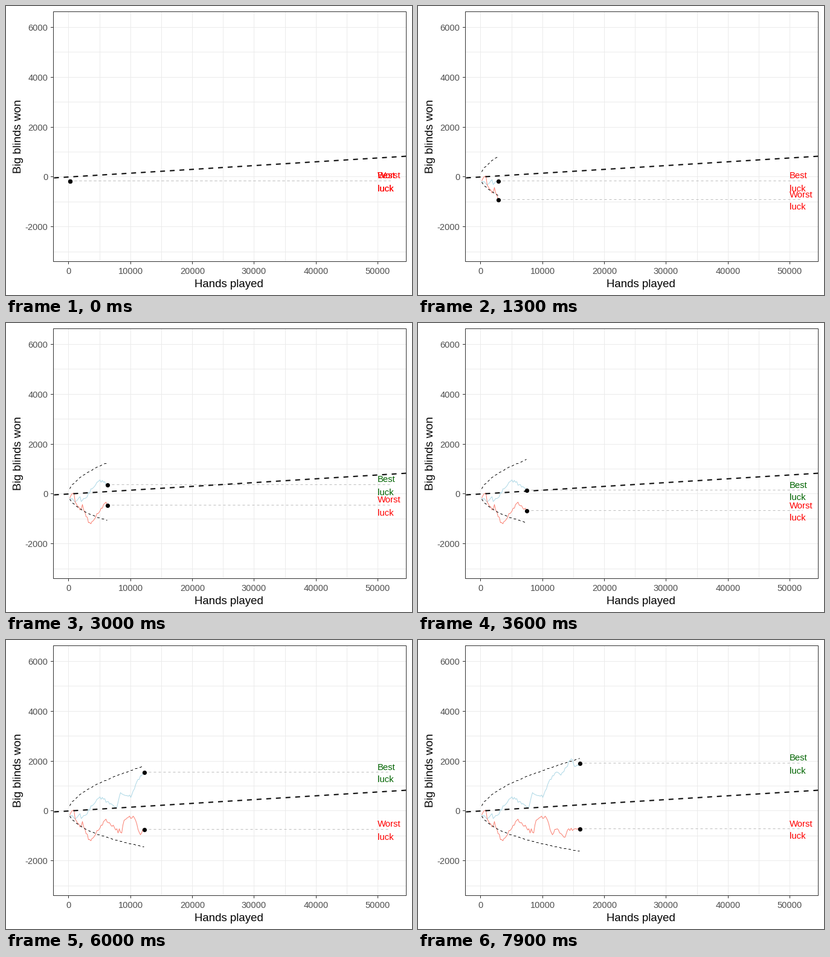
A matplotlib script that plays this animation: 672 px wide and 480 px high, repeating every 8 s.

```python
import numpy as np
import matplotlib.pyplot as plt
from matplotlib.animation import FuncAnimation
from matplotlib.patches import Rectangle

W, H, DPI = 672, 480, 96
PX = 72 / DPI                      # one pixel in points
FRAMES, STEP_MS, HANDS = 80, 100, 200
LEFT, RIGHT, TOP, BOTTOM = 78, 662, 9, 424
WIN_RATE, SPREAD = 0.015, 14.7     # drift per hand, 95 % band factor
DASH = (0, (4, 4))

plt.rcParams.update({"font.family": "Liberation Sans", "path.snap": False})
rng = np.random.default_rng(4)


# Positions are whole pixels, so straight lines stay crisp.
def sx(hands):
    return np.rint(103.33 + 0.010238 * np.asarray(hands))


def sy(won):
    return np.rint(283.4 - 0.0414 * np.asarray(won))


def walk(turns, jitter):
    """Balance at each step: turning points joined by a jittery path."""
    step, won = np.array(turns).T
    noise = rng.normal(0, jitter, FRAMES)
    noise[step] = 0
    return np.interp(np.arange(FRAMES), step, won) + noise


best = walk([(0, -150), (4, -340), (8, -100), (9, -310), (13, -150),
             (15, 50), (23, 500), (26, 550), (36, 160), (38, 160), (41, 740),
             (49, 540), (54, 1180), (60, 1560), (64, 1440), (72, 2090),
             (75, 1780), (79, 1920)], 35)
worst = walk([(0, -150), (2, 20), (5, -400), (9, -620), (10, -430),
              (15, -1140), (17, -1200), (23, -790), (28, -370), (36, -670),
              (42, -890), (45, -330), (52, -280), (57, -950), (60, -740),
              (67, -1050), (69, -760), (79, -710)], 60)
hands = HANDS * np.arange(1, FRAMES + 1)
bands = [WIN_RATE * hands + s * SPREAD * np.sqrt(hands) for s in (1, -1)]

fig = plt.figure(figsize=(W / DPI, H / DPI), dpi=DPI, facecolor="white")
ax = fig.add_axes([0, 0, 1, 1])
ax.set(xlim=(-0.5, W - 0.5), ylim=(H - 0.5, -0.5))   # pixel centres
ax.axis("off")


def line(x, y, color, width=1, **kw):
    return ax.plot(x, y, color=color, lw=width * PX,
                   solid_capstyle="butt", dash_capstyle="butt", **kw)[0]


def label(x, y, text, size, color, **kw):
    return ax.text(x, y, text, fontsize=size, color=color,
                   va="baseline", **kw)


# Panel, grid and axes
for v in range(0, 55000, 5000):
    line([sx(v)] * 2, [TOP, BOTTOM], "#ebebeb", zorder=1)
for v in range(-3000, 7000, 1000):
    line([LEFT, RIGHT], [sy(v)] * 2, "#ebebeb", zorder=1)
for v in range(0, 60000, 10000):
    line([sx(v)] * 2, [BOTTOM, BOTTOM + 4.5], "#333333", zorder=9)
    label(sx(v), 444.5, str(v), 11, "#4d4d4d", ha="center")
for v in range(-2000, 8000, 2000):
    line([LEFT - 4.5, LEFT], [sy(v)] * 2, "#333333", zorder=9)
    label(69, sy(v) + 5.5, str(v), 11, "#4d4d4d", ha="right")
ax.add_patch(Rectangle((LEFT, TOP), RIGHT - LEFT, BOTTOM - TOP, fill=False,
                       ec="#333333", lw=PX, zorder=9))
label(368.5, 466.5, "Hands played", 14, "black", ha="center")
ax.text(28.5, 216, "Big blinds won", fontsize=14.3, color="black",
        rotation=90, ha="right", va="center")

ends = np.array([-2390, 54590])
line(sx(ends), sy(WIN_RATE * ends), "black", 2, ls=DASH, zorder=5)


class Player:
    def __init__(self, name, won, color):
        self.won = won
        self.path = line([], [], color, zorder=3)
        self.guide = line([], [], "#bebebe", ls=DASH, zorder=4)
        self.dot = ax.plot([], [], "o", color="black", ms=7.2 * PX, mew=0,
                           zorder=6)[0]
        self.words = [label(0, 0, w, 11.2, "red", zorder=7)
                      for w in (name, "luck")]

    def update(self, i):
        x, y = sx(hands[i]), sy(self.won[i])
        self.path.set_data(sx(hands[:i + 1]), sy(self.won[:i + 1]))
        self.guide.set_data([x, sx(52000)], [y, y])
        self.dot.set_data([x], [y])
        for word, dy in zip(self.words, (-4, 17)):
            word.set_position((sx(50000) - 0.5, y + dy))
            word.set_color("darkgreen" if self.won[i] > 0 else "red")


players = [Player("Best", best, "lightblue"), Player("Worst", worst, "salmon")]
limits = [line([], [], "black", ls=DASH, zorder=4) for _ in bands]


def update(i):
    for p in players:
        p.update(i)
    for limit, band in zip(limits, bands):
        limit.set_data(sx(hands[:i + 1]), sy(band[:i + 1]))
    return []


anim = FuncAnimation(fig, update, frames=FRAMES, interval=STEP_MS,
                     repeat=True, repeat_delay=0)
plt.show()
```
